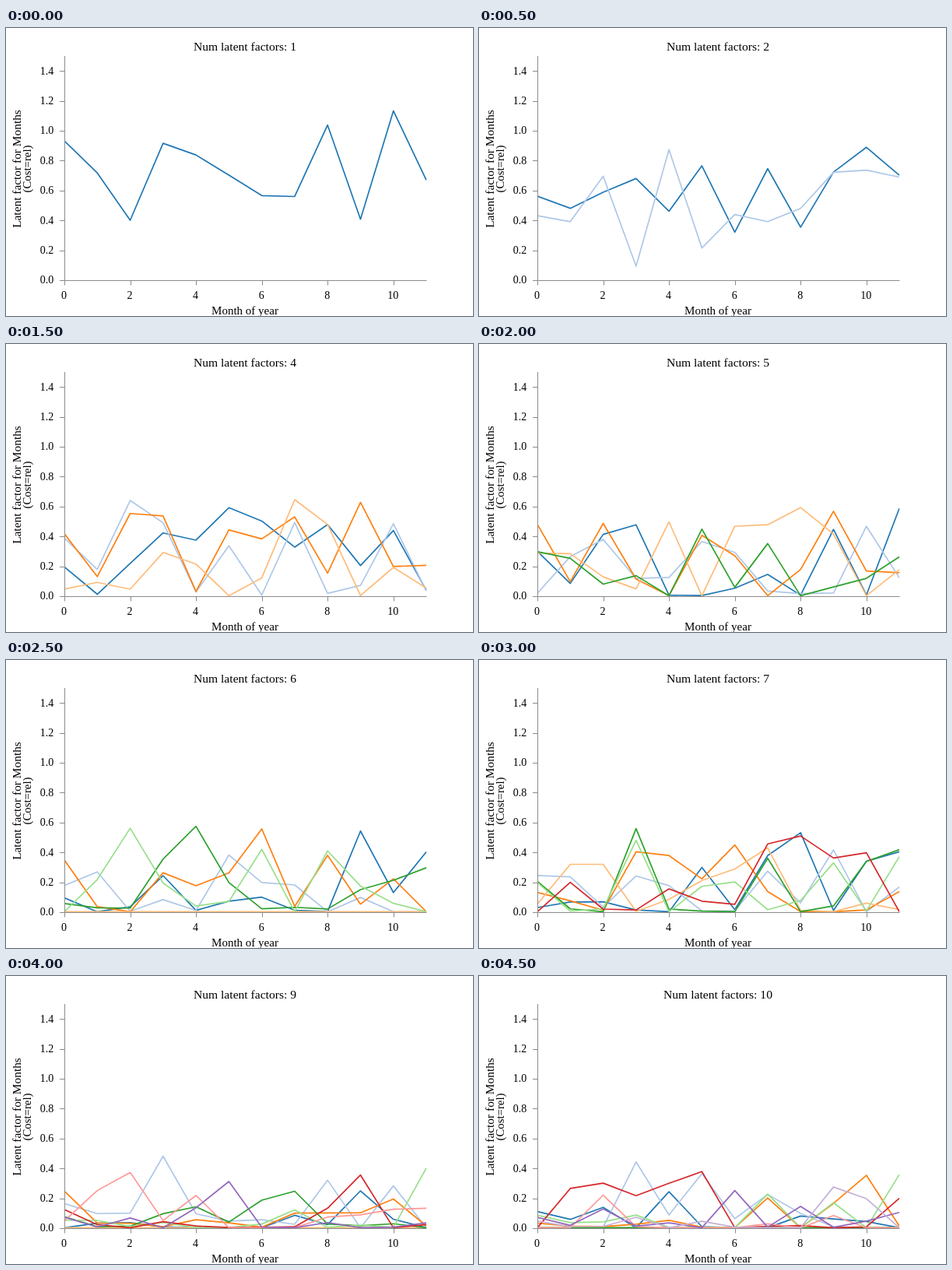
Animation, 600 px wide and 370 px high, one loop 5000 ms. Source, as an HTML page:

```html
<!DOCTYPE html>
<html lang="en">
<head>
<meta charset="utf-8">
<title>Latent factors by month</title>
<style>
html, body { margin: 0; width: 100%; height: 100%; overflow: hidden; background: #fff; }
svg { display: block; }
text { font-family: "Liberation Serif", serif; text-anchor: middle; fill: #000; }
.axis { fill: none; stroke: #8c8c8c; stroke-width: 1; }
.line { fill: none; stroke-width: 1.7; stroke-linejoin: round; }
</style>
</head>
<body>
<svg id="stage" width="600" height="370" viewBox="0 0 600 370">
  <clipPath id="plot"><rect x="75" y="36" width="465.5" height="288.5"/></clipPath>
  <g id="lines" clip-path="url(#plot)"></g>
  <path id="axes" class="axis"/>
  <g id="labels"></g>
</svg>
<script>
const STEP = 500, MONTHS = 12, LEFT = 75, BASE = 324, MONTH_W = 465 / 11, UNIT_H = 192;
const FLOOR = .003, FLAT = -1;
const COLORS = ['#1f77b4', '#aec7e8', '#ff7f0e', '#ffbb78', '#2ca02c',
                '#98df8a', '#d62728', '#ff9896', '#9467bd', '#c5b0d5'];

// Key points of the lone factor
const SINGLE = [.932, .718, .401, .916, .838, .703, .566, .56, 1.038, .408, 1.133, .67];

// Month in which each factor peaks, for two factors and up
const PEAKS = [
  [10, 4],
  [11, 2, 9],
  [5, 2, 9, 7],
  [11, 10, 9, 8, 5],
  [9, 5, 6, FLAT, 4, 2],
  [8, 9, 6, 7, 3, 3, 8],
  [9, 4, 11, 7, 5, 5, 9, 1],
  [9, 3, 0, FLAT, 7, 11, 9, 2, 5],
  [4, 3, 10, FLAT, FLAT, 11, 5, 2, 6, 9]
];

const $ = id => document.getElementById(id);
const px = month => LEFT + month * MONTH_W;
const py = value => BASE - value * UNIT_H;

function seeded(seed) {
  return () => {
    seed = (seed + 0x6d2b79f5) | 0;
    let t = Math.imul(seed ^ (seed >>> 15), 1 | seed);
    t = (t + Math.imul(t ^ (t >>> 7), 61 | t)) ^ t;
    return ((t ^ (t >>> 14)) >>> 0) / 4294967296;
  };
}

// More factors make each one lower and closer to zero away from its peak
function factor(peak, index, count) {
  const random = seeded(count * 100 + index);
  const height = 1.22 * count ** -.4 * (1 - random() * count / 16);
  return Array.from({ length: MONTHS }, (_, month) => {
    const share = month === peak ? 1 : .9 * random() ** (count / 2.8);
    return peak === FLAT ? FLOOR : Math.max(FLOOR, height * share);
  });
}

const fits = [[SINGLE], ...PEAKS.map(row => row.map((peak, i) => factor(peak, i, row.length)))];

function add(parent, name, attrs, text = '') {
  const el = document.createElementNS('http://www.w3.org/2000/svg', name);
  for (const key in attrs) el.setAttribute(key, attrs[key]);
  el.textContent = text;
  return parent.appendChild(el);
}

function label(text, x, y, size, turned) {
  const attrs = { x, y, 'font-size': size };
  if (turned) attrs.transform = `rotate(-90 ${x} ${y})`;
  return add($('labels'), 'text', attrs, text);
}

let axes = 'M75.5 36V324.5H540.5';
for (let m = 0; m < MONTHS; m += 2) {
  axes += `M${Math.round(px(m)) + .5} 324.5v6`;
  label(m, px(m) - .5, 348, 14);
}
for (let i = 0; i <= 7; i++) {
  const y = py(i / 5);
  axes += `M75.5 ${Math.round(y) + .5}h-6.5`;
  label((i / 5).toFixed(1), 52.5, y + 4.3, 14);
}
$('axes').setAttribute('d', axes);

const title = label('', 307, 29, 15.6);
label('Month of year', 307, 368, 15);
label('Latent factor for Months', 19, 181, 15.4, true);
label('(Cost=rel)', 32, 181, 14.8, true);

const lines = COLORS.map(stroke => add($('lines'), 'polyline', { class: 'line', stroke }));

let shown = -1;
function draw(ms) {
  const i = Math.floor(ms / STEP) % fits.length;
  if (i === shown) return;
  shown = i;
  title.textContent = `Num latent factors: ${i + 1}`;
  lines.forEach((line, n) => {
    const row = fits[i][n] || [];
    line.setAttribute('points', row.map((v, m) => `${px(m)},${py(v)}`).join(' '));
  });
}

const start = performance.now();
function tick() {
  draw(performance.now() - start);
  requestAnimationFrame(tick);
}
tick();
</script>
</body>
</html>
```
